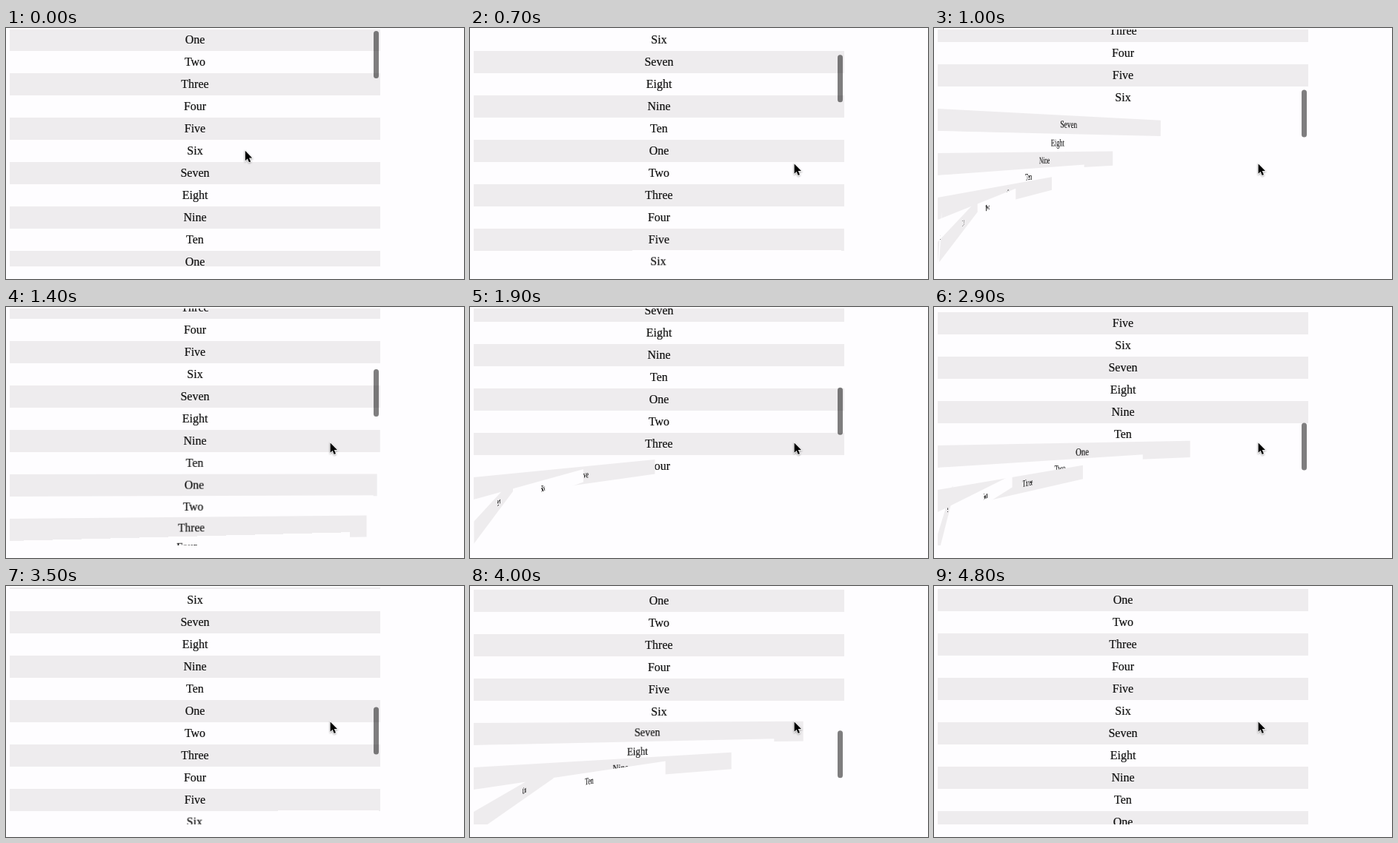
Write an HTML page that moves like this. It is 618 px wide and 339 px high and loops after 4900 ms.

```html
<!DOCTYPE html>
<html lang="en">
<head>
<meta charset="utf-8">
<title>Curling list</title>
<style>
html, body { margin: 0; width: 100%; height: 100%; overflow: hidden; background: #fefdff; }
#list {
  position: absolute; left: 5px; top: 2px; width: 500px; height: 320px;
  overflow: hidden; perspective: 600px; perspective-origin: 0 50%;
}
.row {
  position: absolute; left: 0; width: 500px; height: 30px;
  font: 16px/30px "Liberation Serif", Times, serif; text-align: center;
  color: #111; -webkit-text-stroke: .2px #111;
  background: #fefdff; transform-origin: 0 50%;
}
.row:nth-child(odd) { background: #eeecee; }
#thumb {
  position: absolute; left: 496px; top: 0; width: 7px; height: 64px;
  border-radius: 3.5px; background: rgba(0, 0, 0, .5);
}
#cursor { position: absolute; left: 0; top: 0; overflow: visible; filter: drop-shadow(0 1px 1px rgba(0, 0, 0, .35)); }
</style>
</head>
<body>
<div id="list"></div>
<div id="thumb"></div>
<svg id="cursor" width="14" height="20">
  <path transform="scale(.92)" d="M0 0V14.5L3.3 11.5L5.6 16.9L8 15.9L5.7 10.5H10.2Z" stroke="#fff" stroke-width="1.6" paint-order="stroke"/>
</svg>
<script>
const LOOP = 4900, VIEW = 320, ROW = 30, FOLD_MS = 600;
const words = ['One', 'Two', 'Three', 'Four', 'Five', 'Six', 'Seven', 'Eight', 'Nine', 'Ten'];
const flings = [
  { start: 0, ms: 250, by: 151.5 },
  { start: 765, ms: 260, by: 224.5 },
  { start: 1665, ms: 600, by: 200 },
  { start: 2632, ms: 450, by: 172 },
  { start: 3592, ms: 440, by: 150 }
];

const progress = (t, start, ms) => Math.min(1, Math.max(0, (t - start) / ms));

// Each fling slows down along a quarter sine
const scrollAt = t => flings.reduce(
  (sum, f) => sum + f.by * Math.sin(progress(t, f.start, f.ms) * Math.PI / 2), 0);

// Input at which a rising function reaches a value
function solve(fn, value, hi) {
  let lo = 0;
  for (let i = 0; i < 30; i++) {
    const mid = (lo + hi) / 2;
    if (fn(mid) < value) lo = mid; else hi = mid;
  }
  return hi;
}

// The CSS "ease" curve: cubic-bezier(.25, .1, .25, 1)
const bezier = (u, a, b) => 3 * u * (1 - u) * ((1 - u) * a + u * b) + u ** 3;
const ease = x => bezier(solve(u => bezier(u, .25, .25), x, 1), .1, 1);

const list = document.getElementById('list');
const thumb = document.getElementById('thumb');
const cursor = document.getElementById('cursor');
const rows = Array.from({ length: 50 }, (_, i) => {
  const el = list.appendChild(document.createElement('div'));
  el.className = 'row';
  el.textContent = words[i % words.length];
  const hidden = i * ROW - VIEW;
  return { el, enter: hidden < 0 ? -FOLD_MS : solve(scrollAt, hidden, LOOP) };
});

function draw(t) {
  const offset = Math.round(scrollAt(t) * 2) / 2;
  rows.forEach(({ el, enter }, i) => {
    const top = i * ROW - offset;
    const fold = progress(t, enter, FOLD_MS);
    const shown = top > -ROW && top < VIEW && fold > 0;
    el.style.display = shown ? '' : 'none';
    el.style.top = top + 'px';
    el.style.transform = fold < 1 ? `rotateY(${90 * (1 - ease(fold))}deg)` : 'none';
  });
  thumb.style.transform = `translateY(${3.9 + offset * .2133}px)`;
  thumb.style.opacity = offset > 0 ? 1 - progress(t, 4450, 330) : 0;
  const move = ease(progress(t, 280, 400));
  cursor.style.transform = `translate(${322.8 + 114.8 * move}px, ${165.8 + 17.6 * move}px)`;
}

const start = performance.now();
function frame() {
  draw((performance.now() - start) % LOOP);
  requestAnimationFrame(frame);
}
frame();
</script>
</body>
</html>
```
